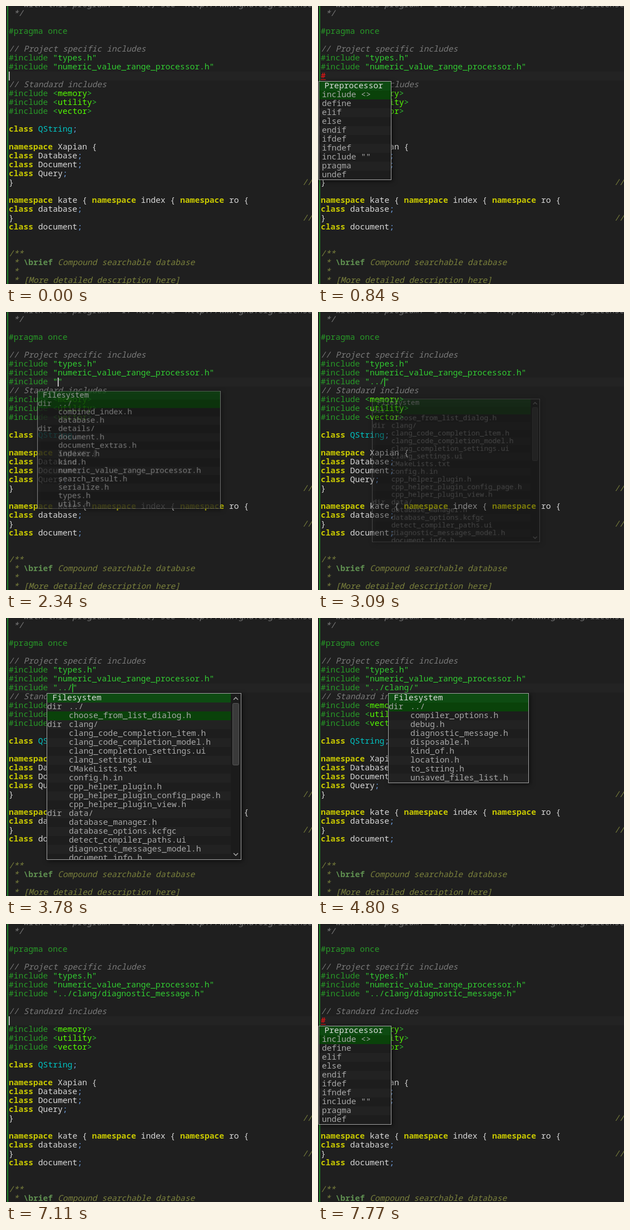
An HTML page with a canvas for the animation above (8 s loop, 550 by 500 pixels).

```html
<!DOCTYPE html>
<html lang="en">
<head>
<meta charset="utf-8">
<title>Include completion</title>
<style>
html, body { margin: 0; width: 550px; height: 500px; overflow: hidden; background: #1f1f1f; }
canvas { display: block; }
</style>
</head>
<body>
<canvas id="stage" width="550" height="500"></canvas>
<script>
const LOOP = 8000, CH = 8.8, ROW = 16, LEFT = 5, EDIT_Y = 118;
const FAMILY = '14.667px "Noto Sans Mono", "DejaVu Sans Mono", monospace';
const ctx = document.getElementById('stage').getContext('2d');
const sheet = document.createElement('canvas');
sheet.width = 360;
sheet.height = 310;
const pop = sheet.getContext('2d');

// style key -> [colour, font prefix]
const STYLES = {
  c: ['#7a7a7a', 'italic '],
  p: ['#289a28', ''],
  q: ['#32cc32', ''],
  b: ['#2fb92f', ''],
  h: ['#55ff00', ''],
  k: ['#c8c800', 'bold '],
  y: ['#00c4c4', ''],
  t: ['#d8d8d8', ''],
  s: ['#6c9ee0', ''],
  d: ['#7a803c', 'italic '],
  g: ['#5f8f50', 'bold '],
  e: ['#ff1414', '']
};

const std = name => ['p', '#include ', 'b', '<', 'h', name, 'b', '>'];
const quoted = name => ['p', '#include ', 'q', '"' + name + '"'];
const cls = name => ['k', 'class', 't', ' ' + name, 's', ';'];
const closing = ['t', '}' + ' '.repeat(59), 'd', '//'];

const head = [
  ['c', ' * with this program.  If not, see <http://www.gnu.org/licenses/>.'],
  ['c', ' */'],
  [],
  ['p', '#pragma once'],
  [],
  ['c', '// Project specific includes'],
  quoted('types.h'),
  quoted('numeric_value_range_processor.h')
];
const heading = ['c', '// Standard includes'];
const tail = [
  std('memory'), std('utility'), std('vector'),
  [],
  ['k', 'class', 't', ' ', 'y', 'QString', 's', ';'],
  [],
  ['k', 'namespace', 't', ' Xapian {'],
  cls('Database'), cls('Document'), cls('Query'),
  closing,
  [],
  ['k', 'namespace', 't', ' kate { ', 'k', 'namespace', 't', ' index { ', 'k', 'namespace', 't', ' ro {'],
  cls('database'),
  closing,
  cls('document'),
  [], [],
  ['d', '/**'],
  ['d', ' * ', 'g', '\\brief', 'd', ' Compound searchable database'],
  ['d', ' *'],
  ['d', ' * [More detailed description here]']
];

// Latest value of a [time, value] list at time t
function at(list, t) {
  let value = list[0][1];
  for (const [time, v] of list) if (t >= time) value = v;
  return value;
}

const error = text => ['e', text];
const edited = [
  [0, []],
  [570, error('#')],
  [1050, error('#i')],
  [1170, error('#in')],
  [1980, quoted('')],
  [2880, quoted('../')],
  [4350, quoted('../clang/')],
  [5550, quoted('../clang/diagnostic_message.h')]
];

// caret: [column, line below the first edited one]
const caretPos = [
  [0, [0, 0]], [570, [1, 0]], [1050, [2, 0]], [1170, [3, 0]],
  [1980, [10, 0]], [2880, [13, 0]], [4350, [19, 0]], [5550, [40, 0]],
  [6330, [0, 1]], [6750, [0, 2]], [6960, [20, 2]], [7110, [0, 3]], [7350, [1, 3]]
];
const caretOn = [
  [0, 1], [90, 0], [420, 1], [840, 0], [1050, 1], [1620, 0], [1980, 1],
  [2520, 0], [2880, 1], [3330, 0], [3780, 1], [4110, 0], [4350, 1],
  [4800, 0], [5190, 1], [6030, 0], [6330, 1], [7500, 0]
];

const directives = ['include <>', 'define', 'elif', 'else', 'endif', 'ifdef', 'ifndef',
  'include ""', 'pragma', 'undef'];
const files = text => text.split(' ');
const startsWith = s => directives.filter(d => d.startsWith(s));

const popups = [
  { title: 'Preprocessor', x: 1, y: 135, w: 131, start: 570, end: 1980,
    rows: [[0, directives], [1050, startsWith('i')], [1170, startsWith('in')]],
    sel: [[0, 0], [1620, 1]] },
  { title: 'Filesystem', x: 46, y: 135, w: 350, start: 2250, end: 2880,
    rows: [[0, files('../ combined_index.h database.h details/ document.h document_extras.h ' +
      'indexer.h kind.h numeric_value_range_processor.h search_result.h serialize.h types.h utils.h')]],
    sel: [[0, 0]] },
  { title: 'Filesystem', x: 73, y: 135, w: 350, h: 300, start: 3060, end: 4350, bar: true,
    rows: [[0, files('../ choose_from_list_dialog.h clang/ clang_code_completion_item.h ' +
      'clang_code_completion_model.h clang_completion_settings.ui clang_settings.ui ' +
      'CMakeLists.txt config.h.in cpp_helper_plugin.h cpp_helper_plugin_config_page.h ' +
      'cpp_helper_plugin_view.h data/ database_manager.h database_options.kcfgc ' +
      'detect_compiler_paths.ui diagnostic_messages_model.h document_info.h')]],
    sel: [[0, 0], [3780, 1], [4110, 2]] },
  { title: 'Filesystem', x: 126, y: 135, w: 253, start: 4530, end: 5550, rest: 0.1, gone: 6330,
    rows: [[0, files('../ compiler_options.h debug.h diagnostic_message.h disposable.h ' +
      'kind_of.h location.h to_string.h unsaved_files_list.h')]],
    sel: [[0, 0], [4920, 1], [5130, 2], [5250, 3]] },
  { title: 'Preprocessor', x: 1, y: 183, w: 131, start: 7490, end: 9000,
    rows: [[0, directives]], sel: [[0, 0]] }
];

function rect(c, color, x, y, w, h) {
  c.fillStyle = color;
  c.fillRect(x, y, w, h);
}

function label(c, text, x, y, color, prefix = '') {
  c.font = prefix + FAMILY;
  c.fillStyle = color;
  c.fillText(text, x, y);
}

function drawLine(tokens, y) {
  let col = 0;
  for (let i = 0; i < tokens.length; i += 2) {
    const [color, prefix] = STYLES[tokens[i]];
    const text = tokens[i + 1];
    const x = LEFT + col * CH;
    label(ctx, text, x, y + 12, color, prefix);
    if (tokens[i] === 'e') rect(ctx, color, x, y + 14, text.length * CH, 1);
    col += text.length;
  }
}

function chevron(x, y, dir) {
  pop.strokeStyle = '#a0a0a0';
  pop.lineWidth = 1.6;
  pop.beginPath();
  pop.moveTo(x - 4, y - 2 * dir);
  pop.lineTo(x, y + 2 * dir);
  pop.lineTo(x + 4, y - 2 * dir);
  pop.stroke();
}

function drawScrollbar(p, h) {
  const x = p.w - 19;
  rect(pop, '#1b1b1b', x, 1, 18, h - 2);
  pop.fillStyle = '#3a3a3a';
  pop.strokeStyle = '#555';
  pop.lineWidth = 1;
  pop.beginPath();
  pop.roundRect(x + 3.5, 18.5, 11, 111, 2);
  pop.fill();
  pop.stroke();
  chevron(x + 9, 10, -1);
  chevron(x + 9, 290, 1);
}

// Paints a list on the spare canvas and returns its height
function paintPopup(p, t) {
  const rows = at(p.rows, t), sel = at(p.sel, t);
  const h = p.h || (rows.length + 1) * ROW + 2;
  const tree = p.title === 'Filesystem';
  pop.clearRect(0, 0, sheet.width, sheet.height);
  pop.save();
  pop.beginPath();
  pop.rect(0, 0, p.w, h);
  pop.clip();
  rect(pop, '#1f1f1f', 0, 0, p.w, h);
  rect(pop, '#0e4b12', 0, 0, p.w, 17);
  label(pop, p.title, 10.5, 13, '#dcdcdc');
  rows.forEach((name, i) => {
    const y = 17 + i * ROW;
    rect(pop, i === sel ? '#0a420a' : i % 2 ? '#1d1d1d' : '#222222', 0, y, p.w, ROW);
    if (tree && name.endsWith('/')) label(pop, 'dir', 1, y + 12, '#a8a8a8');
    label(pop, name, tree ? 40 : 6, y + 12, '#a8a8a8');
  });
  if (p.bar) drawScrollbar(p, h);
  pop.strokeStyle = '#a4a4a4';
  pop.lineWidth = 1;
  pop.strokeRect(0.5, 0.5, p.w - 1, h - 1);
  pop.restore();
  return h;
}

const clamp = v => Math.min(1, Math.max(0, v));

function drawPopup(p, t) {
  if (t < p.start || t >= (p.gone || p.end + 210)) return;
  const grow = 1 - Math.pow(1 - clamp((t - p.start) / 270), 3);
  const fade = Math.max(p.rest || 0, 1 - clamp((t - p.end + 30) / 240));
  const h = paintPopup(p, t);
  const scale = 0.8 + 0.2 * grow;
  ctx.save();
  ctx.globalAlpha = grow * (t < p.end ? 1 : fade);
  ctx.translate(p.x + p.w / 2, p.y + h / 2);
  ctx.scale(scale, scale);
  ctx.shadowColor = 'rgba(0,0,0,0.6)';
  ctx.shadowBlur = 8;
  ctx.shadowOffsetX = ctx.shadowOffsetY = 2;
  ctx.drawImage(sheet, 0, 0, p.w, h, -p.w / 2, -h / 2, p.w, h);
  ctx.restore();
}

function document_(t) {
  const lines = [...head, at(edited, t)];
  if (t >= 6330) lines.push([]);
  lines.push(heading);
  if (t >= 7110) lines.push(t >= 7350 ? error('#') : []);
  return lines.concat(tail);
}

function draw(t) {
  rect(ctx, '#1f1f1f', 0, 0, 550, 500);
  const [col, down] = at(caretPos, t);
  const y = EDIT_Y + down * ROW;
  rect(ctx, '#232323', LEFT, y, 545, ROW);
  rect(ctx, '#1e8228', 2, 0, 2, 500);
  document_(t).forEach((line, i) => drawLine(line, i * ROW - 10));
  if (at(caretOn, t)) {
    const inString = t >= 2880 && t < 5550;
    rect(ctx, inString ? '#32cc32' : '#e8e8e8', Math.round(LEFT + col * CH), y, 1.5, ROW);
  }
  for (const p of popups) drawPopup(p, t);
}

function tick() {
  draw(performance.now() % LOOP);
  requestAnimationFrame(tick);
}
tick();
</script>
</body>
</html>
```
